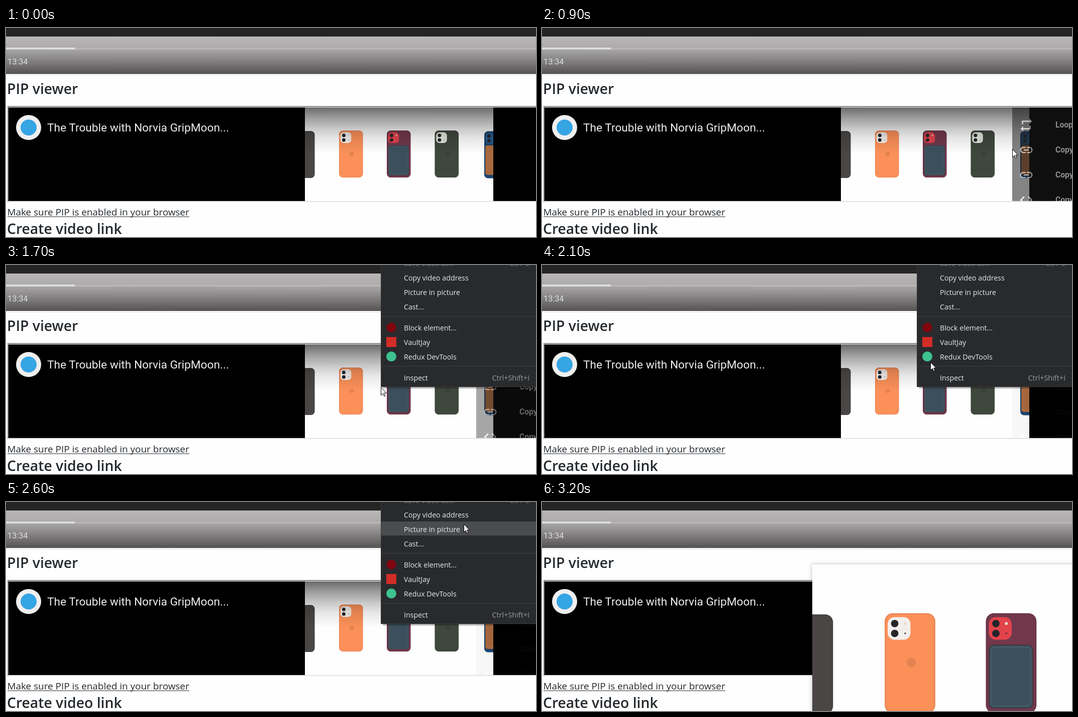
An HTML page that plays this animation: 1055 by 418 pixels, repeating every 3700 ms.

```html
<!DOCTYPE html>
<html lang="en">
<head>
<meta charset="utf-8">
<title>PIP viewer</title>
<style>
html, body { margin: 0; width: 100%; height: 100%; overflow: hidden; background: #fefefe; }
svg { display: block; width: 100vw; height: 100vh; }

.ui { font-family: "Open Sans", "Noto Sans", sans-serif; }
.player { font-family: Roboto, Arial, sans-serif; }
.head { font-size: 28.3px; font-weight: 600; fill: #24292e; }
.link { font-size: 18.9px; fill: #24292e; }
.items { font-size: 14.2px; fill: #e9eaed; }
.keys { font-size: 14.4px; fill: #9a9da1; text-anchor: end; }
.off { fill: #77797d; }
.rows { font-size: 15.6px; font-weight: 600; fill: #eee; }

/* One shared 3.7 s timeline, cut into 100 ms steps */
.anim { animation: 3.7s step-end infinite; }
#cursor { animation-name: move; }
#panel { animation-name: panel; }
#menu { animation-name: menu; }
#hover { animation-name: hover; }
#pip { animation-name: pip; }

@keyframes move {
  0% { transform: translate(1100px, 150px); }
  8.1% { transform: translate(1044px, 166px); }
  10.81% { transform: translate(993px, 199px); }
  13.51% { transform: translate(952px, 229px); }
  16.21% { transform: translate(936px, 242px); }
  27.02% { transform: translate(905px, 242px); }
  29.72% { transform: translate(840px, 243px); }
  32.43% { transform: translate(775px, 244px); }
  35.13% { transform: translate(746px, 244px); }
  54.05% { transform: translate(753px, 229px); }
  56.75% { transform: translate(773px, 194px); }
  59.45% { transform: translate(802px, 140px); }
  62.16% { transform: translate(838px, 96px); }
  64.86% { transform: translate(873px, 64px); }
  67.56% { transform: translate(899px, 48px); }
  70.27% { transform: translate(911px, 44px); }
  81.08%, 100% { transform: translate(1100px, 44px); }
}
@keyframes panel {
  0% { opacity: 0; }
  24.32% { opacity: .6; }
  27.02% { opacity: 1; }
  45.94% { opacity: .43; }
  48.64% { opacity: .03; }
  78.37%, 100% { opacity: 0; }
}
@keyframes menu {
  0% { opacity: 0; }
  45.94% { opacity: 1; }
  78.37%, 100% { opacity: 0; }
}
@keyframes hover {
  0% { opacity: 0; }
  64.86%, 100% { opacity: 1; }
}
@keyframes pip {
  0% { opacity: 0; }
  81.08% { opacity: .45; }
  83.78% { opacity: .85; }
  86.48%, 100% { opacity: 1; }
}
</style>
</head>
<body>
<svg viewBox="0 0 1055 418" preserveAspectRatio="none">
  <defs>
    <linearGradient id="bar" x2="0" y2="1">
      <stop offset="0" stop-color="#b9b6b6"/>
      <stop offset=".3" stop-color="#adabab"/>
      <stop offset=".6" stop-color="#898787"/>
      <stop offset="1" stop-color="#555352"/>
    </linearGradient>
    <linearGradient id="shade" x2="0" y2="1">
      <stop offset="0" stop-opacity=".58"/>
      <stop offset=".23" stop-opacity=".38"/>
      <stop offset=".45" stop-opacity=".22"/>
      <stop offset=".66" stop-opacity=".1"/>
      <stop offset="1" stop-opacity="0"/>
    </linearGradient>
    <clipPath id="frame"><rect x="5" y="159" width="1050" height="187"/></clipPath>
    <clipPath id="picture"><rect width="375" height="187"/></clipPath>

    <g id="phone">
      <rect width="47.5" height="94" rx="7.5" style="fill:var(--body)"/>
      <rect x=".5" y=".5" width="46.5" height="93" rx="7" fill="none" stroke="#000" stroke-opacity=".08"/>
      <rect x="2.8" y="3.6" width="21.4" height="21.4" rx="6.5" style="fill:var(--cam)"/>
      <g fill="#25252b">
        <circle cx="9.4" cy="9.7" r="3.5"/>
        <circle cx="9.4" cy="19" r="3.5"/>
        <circle cx="19.2" cy="9.7" r="1.4" fill="#e6dccb"/>
        <circle cx="19.2" cy="19" r=".7"/>
      </g>
    </g>
    <circle id="dot" cx="25" cy="46.5" r="4.6" fill-opacity=".09"/>
    <g id="wallet">
      <rect x="3" y="30" width="41" height="59.5" rx="4.5" stroke="#000" stroke-opacity=".25" stroke-width=".8" style="fill:var(--body)"/>
      <rect x="5" y="32" width="37" height="55.5" rx="3.5" fill="none" stroke="#fff" stroke-opacity=".09" stroke-width=".7"/>
    </g>

    <g id="video" clip-path="url(#picture)">
      <rect width="375" height="187" fill="#fefefe"/>
      <use href="#phone" x="-28" y="47" style="--body:#4a4646;--cam:#3a3637"/>
      <g transform="translate(68 46)">
        <use href="#phone" style="--body:#fb9059;--cam:#f3efec"/>
        <use href="#dot"/>
      </g>
      <g transform="translate(163 46)">
        <use href="#phone" style="--body:#71384b;--cam:#e2434b"/>
        <use href="#wallet" style="--body:#3b505c"/>
      </g>
      <g transform="translate(258.5 46)">
        <use href="#phone" style="--body:#3f483d;--cam:#e4e6dc"/>
        <use href="#dot"/>
      </g>
      <g transform="translate(357 47.5)">
        <use href="#phone" style="--body:#1b4470;--cam:#275a8c"/>
        <use href="#wallet" x="-1" y="-2" style="--body:#a8693e"/>
      </g>
    </g>

    <path id="chain" d="M3.9 12c0-1.71 1.39-3.1 3.1-3.1h4V7H7a5 5 0 0 0 0 10h4v-1.9H7c-1.71 0-3.1-1.39-3.1-3.1zM8 13h8v-2H8zM17 7h-4v1.9h4a3.1 3.1 0 0 1 0 6.2h-4V17h4a5 5 0 0 0 0-10z"/>
  </defs>

  <!-- page -->
  <rect width="1055" height="418" fill="#fefefe"/>
  <rect width="1055" height="17" fill="#252525"/>
  <rect y="17" width="1055" height="75" fill="url(#bar)"/>
  <rect y="40" width="1055" height="3" fill="#beb5b6"/>
  <rect y="39" width="137" height="4" fill="#dcdcdc"/>
  <rect y="94" width="1055" height="1" fill="#e2e2e2"/>
  <text class="player" x="3" y="73" font-size="16.25" fill="#e0e0e0">13:34</text>
  <g class="ui">
    <text class="head" x="2" y="132">PIP viewer</text>
    <text class="link" x="2.5" y="375">Make sure PIP is enabled in your browser</text>
    <rect x="3" y="377" width="362" height="1" fill="#24292e"/>
    <text class="head" x="2" y="412">Create video link</text>
  </g>

  <!-- embedded player -->
  <path d="M3 156H1055V158H5V348H3z" fill="#858887"/>
  <path d="M5 158H1055V159H5zM5 346H1055V348H4z" fill="#e4e4e4"/>
  <g clip-path="url(#frame)">
    <rect x="5" y="159" width="1050" height="187"/>
    <use href="#video" x="595" y="159"/>
    <rect x="595" y="159" width="375" height="92" fill="url(#shade)"/>
    <circle cx="45" cy="199" r="25" fill="#efefef"/>
    <circle cx="45" cy="199" r="16" fill="#36a5e4"/>
    <text class="player" x="82" y="207" font-size="22.7" fill="#eee">The Trouble with Norvia GripMoon...</text>

    <g id="panel" class="anim player">
      <rect x="936" y="159" width="119" height="187" fill="#1c1c1c" fill-opacity=".9"/>
      <g fill="#eee">
        <path transform="translate(949 179) scale(1.25)" d="M7 7h10v3l4-4-4-4v3H5v6h2zM17 17H7v-3l-4 4 4 4v-3h12v-6h-2z"/>
        <use href="#chain" transform="translate(949 229) scale(1.25)"/>
        <use href="#chain" transform="translate(949 279) scale(1.25)"/>
        <path transform="translate(949 329) scale(1.25)" d="M9.4 16.6L4.8 12l4.6-4.6L8 6l-6 6 6 6zM14.6 16.6l4.6-4.6-4.6-4.6L16 6l6 6-6 6z"/>
      </g>
      <g class="rows">
        <text x="1022" y="199">Loop</text>
        <text x="1022" y="249">Copy video URL</text>
        <text x="1022" y="299">Copy video URL at current time</text>
        <text x="1022" y="349">Copy embed code</text>
      </g>
    </g>
  </g>

  <!-- browser context menu -->
  <g id="menu" class="anim ui">
    <path d="M750 244H1055V246H750z" fill-opacity=".3"/>
    <path d="M751 246H1055V248H751z" fill-opacity=".12"/>
    <rect x="746" y="-4" width="320" height="248" fill="#3a3b3e"/>
    <rect x="747" y="-4" width="320" height="247" fill="#292a2d"/>
    <rect id="hover" class="anim" x="747" y="39" width="308" height="28" fill="#4b4c4f"/>
    <path d="M747 102.5H1055M747 202.5H1055" stroke="#3f4043"/>
    <circle cx="767" cy="125" r="9.5" fill="#800610"/>
    <rect x="757" y="144" width="20" height="20" rx="1" fill="#d32d27"/>
    <circle cx="767" cy="183" r="10" fill="#3ec28f"/>
    <g class="items">
      <text class="off" x="792" y="2">Save video as...</text>
      <text x="792" y="31">Copy video address</text>
      <text x="792" y="60">Picture in picture</text>
      <text x="792" y="89">Cast...</text>
      <text x="792" y="131">Block element...</text>
      <text x="792" y="160">VaultJay</text>
      <text x="792" y="189">Redux DevTools</text>
      <text x="792" y="231">Inspect</text>
    </g>
    <g class="keys">
      <text class="off" x="1042" y="2">Ctrl+S</text>
      <text x="1042" y="231">Ctrl+Shift+I</text>
    </g>
  </g>

  <!-- floating window -->
  <g id="pip" class="anim">
    <rect x="538" y="125" width="795" height="396" fill="#fefefe" style="filter:drop-shadow(0 0 5px rgba(0,0,0,.24))"/>
    <use href="#video" transform="translate(538 125) scale(2.12)"/>
  </g>

  <path id="cursor" class="anim" d="M.5.5V16.5L4.2 13 6.7 18.5 9.1 17.4 6.7 12H11.3z" fill="#fff" stroke="#000"/>
</svg>
</body>
</html>
```
